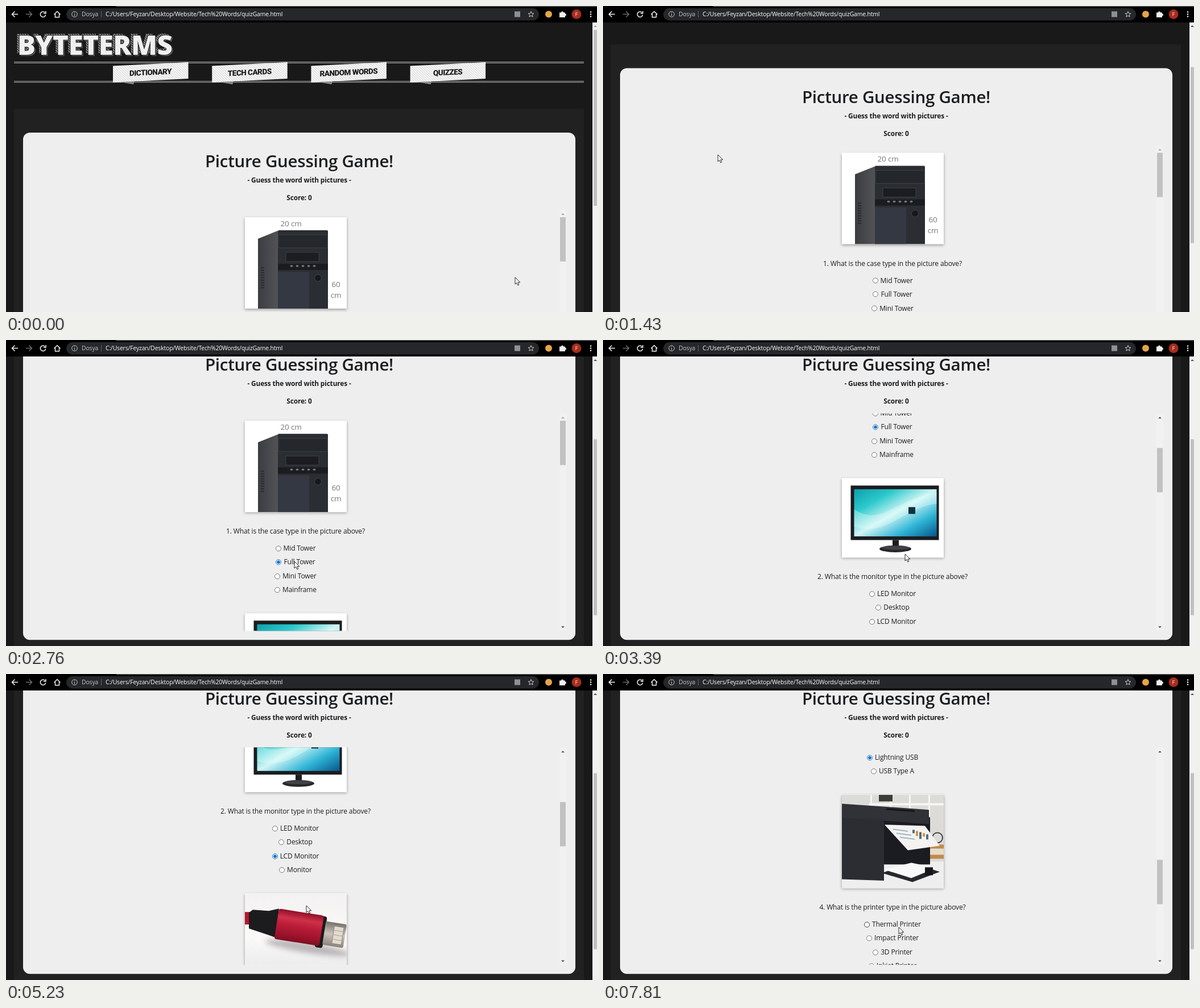
Animation of 1039 by 539 pixels, one loop 8000 ms. Source, as an HTML page:

```html
<!DOCTYPE html>
<html lang="en">
<head>
<meta charset="utf-8">
<title>Picture Guessing Game</title>
<style>
html, body { margin: 0; width: 100%; height: 100%; overflow: hidden; background: #191919; }
#stage {
  position: absolute; left: 0; top: 0; width: 1039px; height: 539px; overflow: hidden;
  background: #191919; color: #1b1d20;
  font: 12px/20px "Open Sans", "Noto Sans", sans-serif; letter-spacing: -.012em;
}
#stage div, #stage svg { position: absolute; }
#page { left: 0; top: 0; width: 1031px; height: 800px; }
#box { left: 14px; top: 181px; width: 1002px; height: 700px; background: #212121; }
#card { left: 30px; top: 222.5px; width: 971px; height: 535px; border-radius: 12px; background: #eee; }
.head { left: 0; width: 971px; text-align: center; white-space: nowrap; }
#title { top: 30.5px; font-size: 29.5px; line-height: 40px; font-weight: 600; letter-spacing: -.009em; }
.bold { font-size: 11.9px; font-weight: 700; }
#list { left: 45px; top: 359px; width: 928px; height: 383px; overflow: hidden; }
#rows { left: 0; top: 0; width: 928px; }
.pic { left: 374.5px; width: 179px; background: #fff; overflow: hidden; box-shadow: 0 2px 5px rgba(0,0,0,.35); }
.row { left: 0; width: 928px; height: 20px; display: flex; justify-content: center; align-items: center; white-space: nowrap; }
.row i { box-sizing: border-box; width: 10px; height: 10px; margin-right: 4px; border: 1px solid #767676; border-radius: 50%; background: #fff; }
.row.hover i { border-color: #3c3c3c; }
.row.on i { border-color: #1a78c8; background: radial-gradient(circle, #1a78c8 2.6px, #fff 3.2px); }
.track { background: #f1f1f1; }
.thumb { background: #c1c1c1; }
.arrow { width: 0; height: 0; border: 3px solid transparent; }
.up { border-top-width: 0; border-bottom-color: #505050; }
.down { border-bottom-width: 0; border-top-color: #505050; }
</style>
</head>
<body>
<div id="stage">
  <div id="page">
    <svg width="1031" height="160">
      <defs>
        <pattern id="hatch" width="3" height="3" patternUnits="userSpaceOnUse" patternTransform="rotate(-45)">
          <rect width="1.5" height="3" fill="#bbb"/>
        </pattern>
        <pattern id="paper" width="3" height="3" patternUnits="userSpaceOnUse" patternTransform="rotate(-45)">
          <rect width="3" height="3" fill="#f8f8f8"/><rect width="1" height="3" fill="#d6d6d6"/>
        </pattern>
      </defs>
      <g id="logo" font-size="47.5" font-weight="800" letter-spacing="-.5"></g>
      <path d="M14 98.5H1016M14 100.5H1016M14 132.5H1016M14 134.5H1016" stroke="#a4a4a4"/>
      <g id="nav" font-family="Roboto, sans-serif" font-size="13.5" font-weight="900" letter-spacing="-.5" text-anchor="middle" fill="#1c1c1c"></g>
    </svg>
    <div id="box"></div>
    <div id="card">
      <div class="head" id="title">Picture Guessing Game!</div>
      <div class="head bold" style="top:73.5px">- Guess the word with pictures -</div>
      <div class="head bold" style="top:104px">Score: 0</div>
    </div>
    <div id="list"><div id="rows"></div></div>
    <div class="track" style="left:973px;top:359px;width:12px;height:383px"></div>
    <div class="arrow up" id="innerUp" style="left:976px;top:365px"></div>
    <div class="arrow down" style="left:976px;top:733.5px"></div>
    <div class="thumb" id="innerThumb" style="left:974px;top:372px;width:10px;height:78px"></div>
  </div>
  <div class="track" style="left:1031px;top:29px;width:8px;height:510px"></div>
  <div class="arrow up" id="pageUp" style="left:1033px;top:34px"></div>
  <div class="thumb" id="pageThumb" style="left:1033px;top:42px;width:6px;height:310px"></div>

  <svg width="1039" height="29" fill="none" stroke="#f1f1f1" stroke-width="1.5">
    <rect width="1039" height="29" fill="#000" stroke="none"/>
    <path d="M194 .5H1039" stroke="#777" stroke-width="1"/>
    <path id="back" d="M21 14.5H11M15.5 9.5L10.5 14.5L15.5 19.5"/>
    <use href="#back" transform="matrix(-1 0 0 1 56 0)" opacity=".45"/>
    <path d="M68.5 11.5A4.7 4.7 0 1 0 69.7 15.5M70 9V13H66"/>
    <path d="M84.5 15L90 9.5L95.5 15M86.500 14V19.700H93.500V14"/>
    <rect x="106" y="4" width="831" height="21.5" rx="10.7" fill="#26272a" stroke="none"/>
    <g stroke="#ccc" stroke-width="1">
      <circle cx="120.5" cy="14.5" r="4.8"/>
      <path d="M120.5 14V17.500M120.5 11.5V12.700"/>
      <path d="M167.5 9V20" stroke="#666"/>
      <path id="star"/>
    </g>
    <g stroke="none" font-size="10.4" fill="#f1f1f1">
      <text x="133" y="18.3" fill="#c4c6c9">Dosya</text>
      <text x="175" y="18.3" fill="#fff">C:/Users/Feyzan/Desktop/Website/Tech%20Words/quizGame.html</text>
      <rect x="894" y="9.5" width="10" height="10" fill="#8d9094"/>
      <circle cx="954" cy="14.5" r="6" fill="#e5a44a"/>
      <path d="M973 11.5H983V20H973ZM976 11.5A2 2 0 1 1 980 11.500ZM983 13.500A2 2 0 1 1 983 17.500Z"/>
      <circle cx="1003" cy="14.5" r="8.5" fill="#a82c1c"/>
      <text x="1003" y="18" font-size="9.5" text-anchor="middle">F</text>
      <g id="dots"></g>
    </g>
  </svg>
  <svg id="cursor" width="14" height="18" viewBox="-1 -1 14 18">
    <path d="M0 0V12L2.8 9.5L4.8 14L6.8 13L4.9 8.8H8.8Z" fill="#fff" stroke="#111" stroke-width=".9"/>
  </svg>
</div>

<script>
const $ = id => document.getElementById(id);
const repeat = (n, make) => Array.from({ length: n }, (_, i) => make(i)).join('');
const rect = (x, y, w, h, fill, more = '') => `<rect x="${x}" y="${y}" width="${w}" height="${h}" fill="${fill}" ${more}/>`;
const oval = (x, y, rx, ry, fill, more = '') => `<ellipse cx="${x}" cy="${y}" rx="${rx}" ry="${ry}" fill="${fill}" ${more}/>`;
const poly = (points, fill) => `<polygon points="${points}" fill="${fill}"/>`;
// A rectangle with upright sides whose top and bottom slope by an angle.
const slab = (x, y, w, h, angle, fill) => rect(0, 0, w, h, fill, `transform="translate(${x} ${y}) skewY(${angle})"`);
const gradient = (id, dir, ...colors) => `<linearGradient id="${id}" ${dir}>` +
  colors.map((c, i) => `<stop offset="${i / (colors.length - 1)}" stop-color="${c}"/>`).join('') + '</linearGradient>';
const ACROSS = 'x2="1" y2="0"', DOWN = 'x2="0" y2="1"', DIAGONAL = 'x2="1" y2="1"';

// Header
const word = (dx, dy, look) => `<text x="${20 + dx}" y="${85.5 + dy}" ${look}>BYTETERMS</text>`;
$('logo').innerHTML = word(-4, -2.5, 'fill="url(#hatch)"') + word(2, 2, 'fill="#666"') +
  word(0, 0, 'fill="#f0f0f0" stroke="#1a1a1a" stroke-width="2" paint-order="stroke"');

$('nav').innerHTML = ['DICTIONARY', 'TECH CARDS', 'RANDOM WORDS', 'QUIZZES'].map((label, i) =>
  `<g transform="translate(${188 + 174.2 * i} 99)">` + poly('1,33 38,33 36,39', '#8c8c8c') +
  slab(0, 6.5, 132.5, 29, -2.8, 'url(#paper)') +
  `<text transform="translate(66 22.5) skewY(-2.8)">${label}</text></g>`).join('');

$('star').setAttribute('d', 'M' + Array.from({ length: 10 }, (_, i) => {
  const r = i % 2 ? 2.3 : 5.3, a = i * Math.PI / 5;
  return `${923 + r * Math.sin(a)} ${14.8 - r * Math.cos(a)}`;
}).join('L') + 'Z');
$('dots').innerHTML = repeat(3, i => oval(1028, 10.5 + 4 * i, 1.3, 1.3, '#f1f1f1'));

// Pictures, each 179 wide
const label = (x, y, s) => `<text x="${x}" y="${y}" font-size="13.5" fill="#777" text-anchor="middle">${s}</text>`;
const tower =
  label(81, 15.5, '20 cm') + label(160, 122.5, '60') + label(160, 141.5, 'cm') +
  gradient('side', ACROSS, '#3b3d40', '#515356') +
  slab(23, 38, 35, 150, -22, 'url(#side)') +
  rect(58, 23, 88, 150, '#2a2d32', 'rx="2"') +
  rect(59, 31, 86, 23, '#24272c', 'stroke="#3d4148"') +
  rect(72, 62, 58, 16, '#1b1d21', 'stroke="#3d4148"') +
  rect(58, 82, 88, 11, '#1a1c20') +
  repeat(5, i => oval(82 + 10 * i, 86, 2.5, 1.8, '#777')) +
  rect(58, 96, 55, 70, '#343842') +
  oval(128.5, 107, 6, 6, '#16181c', 'stroke="#41454c"') +
  repeat(9, i => rect(28, 88 + i * 4.4, 6, 2, '#292b2f'));

const monitor =
  gradient('glow', DIAGONAL, '#0f9fac', '#2cc9cc', '#d2f5f4', '#2fb5d6', '#06568c') +
  rect(15.5, 13, 155, 96, '#1b1d20') + rect(21.5, 19.5, 145, 83, 'url(#glow)') +
  '<path d="M21.5 55C70 85 90 40 166.500 25V45C110 50 80 105 21.500 85Z" fill="#e4fffb" opacity=".35"/>' +
  rect(117, 51, 12, 12, '#12303c') +
  rect(89, 109, 11, 12, '#1b1d20') +
  oval(94, 124.5, 28, 6, '#26282b') + oval(94, 122.5, 24, 3.5, '#404246');

const cable =
  gradient('desk', DOWN, '#f3f1f1', '#fbfaf8', '#e4e3e8') +
  gradient('red', DOWN, '#8e1026', '#d0304a', '#b81c36', '#a3142e', '#7d0f22') +
  gradient('metal', DOWN, '#77716c', '#cbc4bd', '#8a837c') +
  rect(0, 0, 179, 155, 'url(#desk)') +
  oval(110, 96, 75, 9, '#a09a9e', 'transform="rotate(9 110 96)" style="filter:blur(5px)" opacity=".7"') +
  rect(-5, 33, 20, 22, '#b5162f') +
  poly('7,34 14,29 42,31 60,27 54,78 40,73 7,62', '#1c1b1e') +
  '<g transform="translate(60 27) rotate(9)">' +
  rect(72, 1, 14, 56, '#1c1a1d', 'rx="4"') + rect(0, 0, 80, 54, 'url(#red)', 'rx="4"') +
  rect(85, 9, 37, 42, 'url(#metal)', 'rx="3"') + rect(101, 15, 17, 31, '#e1dbd0', 'stroke="#8b8178"') +
  repeat(3, i => rect(102, 22 + 8 * i, 15, 1, '#b39f7c')) + '</g>';

const printer =
  rect(0, 0, 179, 165, '#dddbd8') +
  repeat(4, i => rect(50 + i * 34, 0, 3, 38, '#f7f6f4')) + rect(48, 15, 131, 4, '#f7f6f4') +
  rect(65, 0, 24, 12, '#3b3c35') +
  rect(0, 118, 179, 47, '#eeeeef') +
  repeat(3, i => rect(148, 88 + i * 9, 31, 7, i % 2 ? '#e9dcc4' : '#c08a4e')) +
  oval(168, 76, 9, 9, 'none', 'stroke="#444" stroke-width="2"') +
  slab(0, 40, 155, 83, 0, '#1b1c21') +
  slab(0, 16, 153, 25, 4, '#303238') + slab(78, 24, 50, 3, 4, '#15161a') +
  slab(0, 41, 74, 108, 2, '#2b2d33') +
  poly('75,53 146,55 172,90 116,98', '#f4f3f1') +
  repeat(3, i => slab(90 + 6 * i, 60 + 7 * i, 26, 2, 8, '#9db6c2')) +
  repeat(5, i => rect(124 + i * 6, 62 + i * 2, 4, 6 + i % 3 * 3, i % 2 ? '#d89435' : '#4c6d83')) +
  poly('70,138 124,120 172,136 124,154', '#26282e') + poly('74,132 122,120 166,129 122,147', '#f8f8f8') +
  rect(146, 128, 14, 14, '#17181c');

// Quiz list
const quiz = [
  { art: tower, height: 161, topic: 'case', answers: ['Mid Tower', 'Full Tower', 'Mini Tower', 'Mainframe'], pick: 1, when: 2600 },
  { art: monitor, height: 140, topic: 'monitor', answers: ['LED Monitor', 'Desktop', 'LCD Monitor', 'Monitor'], pick: 2, when: 4480 },
  { art: cable, height: 154.5, topic: 'USB', answers: ['Micro USB', 'Mini USB', 'Lightning USB', 'USB Type A'], pick: 2, when: 6720 },
  { art: printer, height: 165, topic: 'printer', answers: ['Thermal Printer', 'Impact Printer', '3D Printer', 'Inkjet Printer'] }
];
const options = [];
const add = (type, top, html) => {
  const el = document.createElement('div');
  el.className = type;
  el.style.top = top + 'px';
  el.innerHTML = html;
  $('rows').append(el);
  return el;
};
let top0 = 13;
quiz.forEach(({ art, height, topic, answers, pick, when }, n) => {
  const bottom = top0 + height;
  add('pic', top0, `<svg width="179" height="${height}">${art}</svg>`).style.height = height + 'px';
  add('row', bottom + 24, `${n + 1}. What is the ${topic} type in the picture above?`);
  answers.forEach((text, i) => {
    const y = bottom + 64 + 24.4 * i;
    options.push({ el: add('row', y - 10, `<i></i>${text}`), y, when: i === pick ? when : Infinity });
  });
  top0 = bottom + 177.8;
});

// Motion: each move eases to its goal between two times.
const LOOP = 8000, NOTCH = 76.57;
const move = (from, to, ...goal) => ({ from, to, goal });
const pageMoves = [move(1245, 1620, 3 * NOTCH)];
const listMoves = [move(2830, 3638, 4 * NOTCH), move(5060, 5490, 8 * NOTCH), move(6880, 7750, 12 * NOTCH)];
const mouseMoves = [
  move(0, 380, 709, 298), move(940, 1220, 202, 262), move(1760, 2510, 507, 390), move(2760, 3040, 531, 377),
  move(4080, 4480, 522, 428), move(4620, 5000, 528, 408), move(5890, 6720, 519, 454), move(6880, 7200, 520, 446)
];

const ease = p => p * p * (3 - 2 * p);
const follow = (start, moves, t) => moves.reduce((now, { from, to, goal }) => {
  const p = ease(Math.min(1, Math.max(0, (t - from) / (to - from))));
  return now.map((v, i) => v + (goal[i] - v) * p);
}, start);
const shift = (id, x, y) => { $(id).style.transform = `translate(${x}px, ${y}px)`; };
const lightUp = (id, scrolled) => { $(id).style.borderBottomColor = scrolled > 0 ? '#505050' : '#a3a3a3'; };

function draw(t) {
  const [page] = follow([0], pageMoves, t), [list] = follow([0], listMoves, t);
  const [x, y] = follow([895, 478], mouseMoves, t).map(Math.round);
  shift('page', 0, -page);
  shift('pageThumb', 0, page * .578);
  shift('rows', 0, -list);
  shift('innerThumb', 0, list * .2015);
  shift('cursor', x - 1, y - 1);
  lightUp('pageUp', page);
  lightUp('innerUp', list);
  for (const o of options) {
    const rowY = 359 - page + o.y - list;
    o.el.classList.toggle('on', t >= o.when);
    o.el.classList.toggle('hover', Math.abs(y - rowY) < 9 && Math.abs(x - 510) < 45);
  }
}

const start = performance.now();
function loop() {
  draw((performance.now() - start) % LOOP);
  requestAnimationFrame(loop);
}
loop();
</script>
</body>
</html>
```
